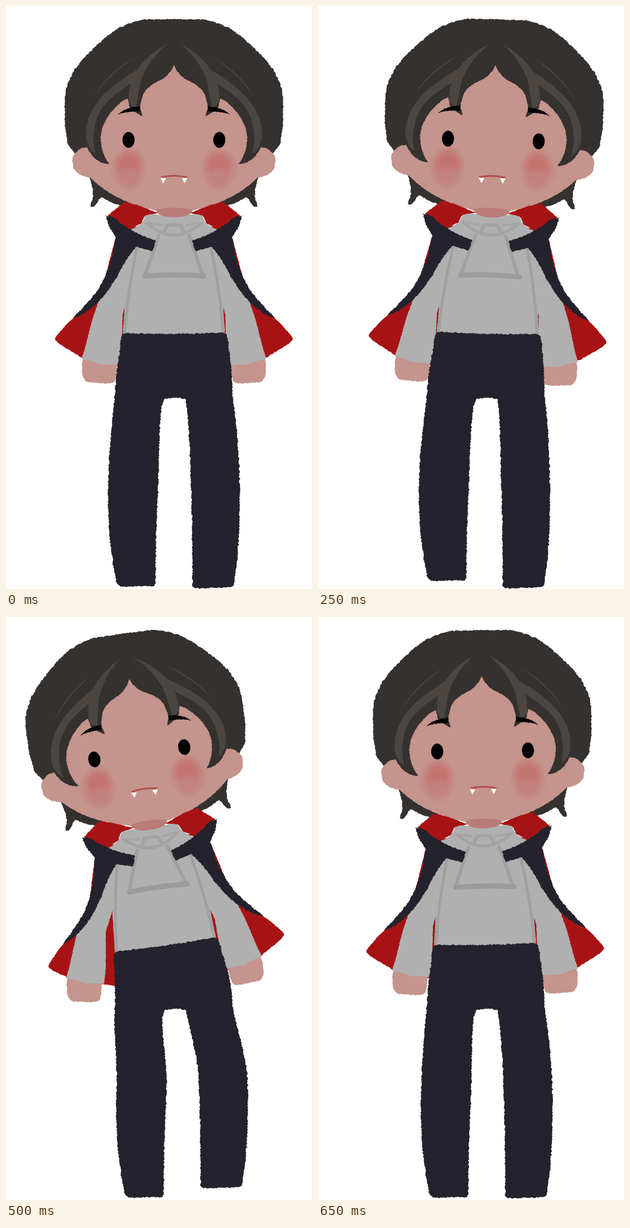
These frames come from a looping animation (543 px wide and 1032 px high, 700 ms). An HTML page with a canvas:

```html
<!DOCTYPE html>
<html lang="en">
<head>
<meta charset="utf-8">
<title>Swaying vampire</title>
<style>
html, body { margin: 0; width: 100%; height: 100%; overflow: hidden; background: #fff; }
canvas { display: block; width: 543px; height: 1032px; }
</style>
</head>
<body>
<canvas id="stage" width="543" height="1032"></canvas>
<script>
const ctx = document.getElementById('stage').getContext('2d');
const MID = 298, HIP = 690, STEP = 50, STEPS = 14;
// Lean in degrees from the far right to the far left; played back and forth.
const LEAN = [2.84, 2.4, 1.66, 0, -0.75, -2.95, -5.28, -7.8];
const HAIR = '#35312f', SHINE = '#4b4642', SKIN = '#c4948d', NAVY = '#24222c',
      RED = '#a71314', SHIRT = '#b0b0b0', FOLD = '#9b9a9c';

let seed = 7;
function rand() {
  seed = (seed * 16807) % 2147483647;
  return seed / 2147483647;
}

// Turn path data into a polyline with a slightly ragged, brushed edge.
function rough(d, amount = 0.8) {
  const path = document.createElementNS('http://www.w3.org/2000/svg', 'path');
  path.setAttribute('d', d);
  const length = path.getTotalLength(), points = [];
  for (let s = 0; s < length; s += 2) {
    const p = path.getPointAtLength(s);
    points.push([p.x + (rand() * 2 - 1) * amount, p.y + (rand() * 2 - 1) * amount]);
  }
  return points;
}

const outline = {
  dome: rough('M302 23 L245 24 Q220 28 195 42 Q170 59 150 80 Q125 104 116 124 Q104 146 104 172 L104 205 Q107 235 111 248 L121 260 L302 260Z', 1),
  tuft: rough('M148 303 Q156 325 154 340 L149 355 Q156 357 162 349 L168 338 L192 350 L206 354 L225 345 L160 296Z'),
  face: rough('M302 80 L230 110 L168 180 L160 246 Q148 244 143 250 Q129 252 125 259 Q117 264 118 274 Q118 288 124 292 Q128 300 150 304 Q174 328 205 342 Q230 354 265 362 L302 367Z', 0.6),
  fringe: rough('M302 40 L210 70 L140 130 L122 200 L128 240 Q140 243 148 258 Q161 279 184 280 Q170 264 168 236 Q168 214 184 191 Q199 171 216 163 Q217 174 222 183 L242 196 L238 178 Q240 160 248 149 Q259 138 275 131 Q291 122 298 104 L302 104Z', 0.6),
  streak: rough('M232 89 Q180 117 154 164 Q181 122 232 89Z', 0.4),
  shine: rough('M248 103 C202 132 158 158 145 204 C137 236 144 250 159 262 C152 238 155 206 170 181 C186 157 218 141 238 126Z', 0.5),
  lock: rough('M286 67 Q240 93 227 123 Q216 145 218 171 L230 183 Q234 160 238 139 Q247 101 286 67Z', 0.5),
  brow: rough('M199 192 Q213 178 238 178 L238 187 Q216 186 199 192Z', 0.6),
  lining: rough('M302 390 L200 390 L165 520 L120 552 Q96 574 87 588 Q88 593 96 599 L132 621 L200 639 L302 645Z', 0.6),
  collar: rough('M210 347 Q237 351 262 364 L274 366 L247 371 L240 385 L219 395 L200 383 L180 371Z', 0.6),
  cape: rough('M177 371 Q190 371 200 382 Q219 395 242 407 L266 415 L260 434 L231 426 Q213 448 201 472 Q181 508 163 524 Q142 546 117 553 Q143 530 164 501 Q186 462 190 431 L195 409 L183 391Z', 0.9),
  sleeve: rough('M232 422 Q203 460 179 504 L165 521 Q154 549 147 579 Q141 603 134 625 Q151 627 168 635 Q184 634 201 637 L205 610 L207 545 L226 490Z', 0.5),
  hand: rough('M137 622 Q133 640 136 654 Q139 665 147 666 L174 668 Q191 669 194 662 L198 632Z', 0.7),
  torso: rough('M302 375 Q273 374 264 369 Q251 368 246 374 Q244 386 221 396 L229 430 L214 490 L207 584 L302 584Z', 0.4),
  trousers: rough('M204 586 Q205 579 213 579 Q300 582 383 578 Q391 579 393 585 L400 640 L403 700 Q411 750 413 800 Q416 850 414 920 Q412 976 406 1012 Q405 1028 399 1029 L337 1031 Q331 1030 331 1022 L330 900 L326 780 Q323 722 318 696 Q298 691 280 696 Q274 715 273 745 L270 850 L266 950 L265 1023 Q264 1028 258 1027 L204 1028 Q196 1026 194 1010 Q182 947 181 875 Q181 815 187 752 L193 690 L196 650 L203 600Z', 1.1)
};

function fill(points, color) {
  ctx.beginPath();
  for (const [x, y] of points) ctx.lineTo(x, y);
  ctx.closePath();
  ctx.fillStyle = color;
  ctx.fill();
}

function line(d, width, color) {
  ctx.strokeStyle = color;
  ctx.lineWidth = width;
  ctx.lineCap = ctx.lineJoin = 'round';
  ctx.stroke(new Path2D(d));
}

function both(draw) {
  draw();
  ctx.save();
  ctx.translate(2 * MID, 0);
  ctx.scale(-1, 1);
  draw();
  ctx.restore();
}

const pair = (name, color) => both(() => fill(outline[name], color));

function turn(x, y, degrees) {
  ctx.translate(x, y);
  ctx.rotate(degrees * Math.PI / 180);
  ctx.translate(-x, -y);
}

function ellipse(x, y, rx, ry, color) {
  ctx.beginPath();
  ctx.ellipse(x, y, rx, ry, 0, 0, 7);
  ctx.fillStyle = color;
  ctx.fill();
}

function glow(x, y, r, rgb, alpha) {
  const g = ctx.createRadialGradient(x, y, r * 0.45, x, y, r);
  g.addColorStop(0, `rgba(${rgb},${alpha})`);
  g.addColorStop(1, `rgba(${rgb},0)`);
  ellipse(x, y, r, r, g);
}

function arm(swing) {
  ctx.save();
  turn(225, 440, swing);
  fill(outline.hand, SKIN);
  fill(outline.sleeve, SHIRT);
  ctx.restore();
}

function arms(lean) {
  arm(Math.max(0, -lean) * 0.77);
  ctx.save();
  ctx.translate(2 * MID, 0);
  ctx.scale(-1, 1);
  arm(-lean * (lean > 0 ? 0.47 : 0.12));
  ctx.restore();
}

const smooth = v => {
  v = Math.min(1, Math.max(0, v));
  return v * v * (3 - 2 * v);
};

// The waist follows the lean, knees drift the other way and one foot lifts.
function bend([x, y], lean) {
  const left = x < MID;
  const a = lean * Math.PI / 180 * (1 - smooth((y - 600) / 110));
  const dx = x - MID, dy = y - HIP;
  const drift = -lean * (left && lean > 0 ? 1.25 : 1.85) * smooth((y - 680) / 150);
  const lift = left ? Math.max(0, lean) * 6.1 : Math.max(0, -lean) * 2.5;
  return [
    MID + dx * Math.cos(a) - dy * Math.sin(a) + drift,
    HIP + dx * Math.sin(a) + dy * Math.cos(a) - lift * Math.max(0, y - 700) / 328
  ];
}

function drawShirt() {
  pair('torso', SHIRT);
  both(() => {
    line('M232 430 Q215 510 211 577', 5, '#a09fa1');
    line('M249 384 Q260 394 280 403', 5, '#a3a2a4');
    line('M250 384 L277 388', 4, '#a6a5a7');
    line('M298 387 L286 388 L279 402 Q288 406 298 405', 6, '#a3a2a4');
    line('M271 407 Q258 443 247 477', 6, '#a09fa1');
  });
  line('M247 478 Q298 474 351 478', 9, FOLD);
}

function drawHead() {
  pair('tuft', HAIR);
  pair('dome', HAIR);
  pair('face', SKIN);
  both(() => {
    glow(217, 290, 35, '194,116,112', 0.55);
    glow(219, 277, 29, '198,103,99', 0.55);
    glow(219, 305, 24, '194,131,126', 0.8);
  });
  pair('fringe', HAIR);
  for (const part of ['streak', 'shine', 'lock']) pair(part, SHINE);
  pair('brow', '#080707');
  both(() => ellipse(217.5, 237, 10.7, 14, '#000'));
  line('M276 303 Q298 298 321 303', 3, '#b34e4a');
  both(() => fill([[274, 304], [284, 305], [279, 314]], '#fff'));
}

function drawBody(lean) {
  ctx.save();
  turn(MID, HIP, lean);
  pair('lining', RED);
  arms(lean);
  drawShirt();
  ctx.restore();

  fill(outline.trousers.map(p => bend(p, lean)), NAVY);

  ctx.save();
  turn(MID, HIP, lean);
  drawHead();
  pair('collar', RED);
  pair('cape', NAVY);
  // Shirt collar and the shade under the chin
  ctx.fillStyle = SHIRT;
  ctx.fill(new Path2D('M246 374 Q251 367 268 369 L298 372 L328 369 Q345 367 350 374 L346 382 L298 384 L250 382Z'));
  ctx.fillStyle = '#ba7c78';
  ctx.fill(new Path2D('M266 361 Q278 357 298 357 Q322 357 331 362 Q327 374 298 374 Q270 374 266 361Z'));
  ctx.restore();
}

function frame(now) {
  const step = (Math.floor(now / STEP) + 11) % STEPS;
  ctx.fillStyle = '#fff';
  ctx.fillRect(0, 0, 543, 1032);
  drawBody(LEAN[Math.min(step, STEPS - step)]);
}

let start;
function tick(now) {
  start ??= now;
  frame(now - start);
  requestAnimationFrame(tick);
}
frame(0);
requestAnimationFrame(tick);
</script>
</body>
</html>
```
